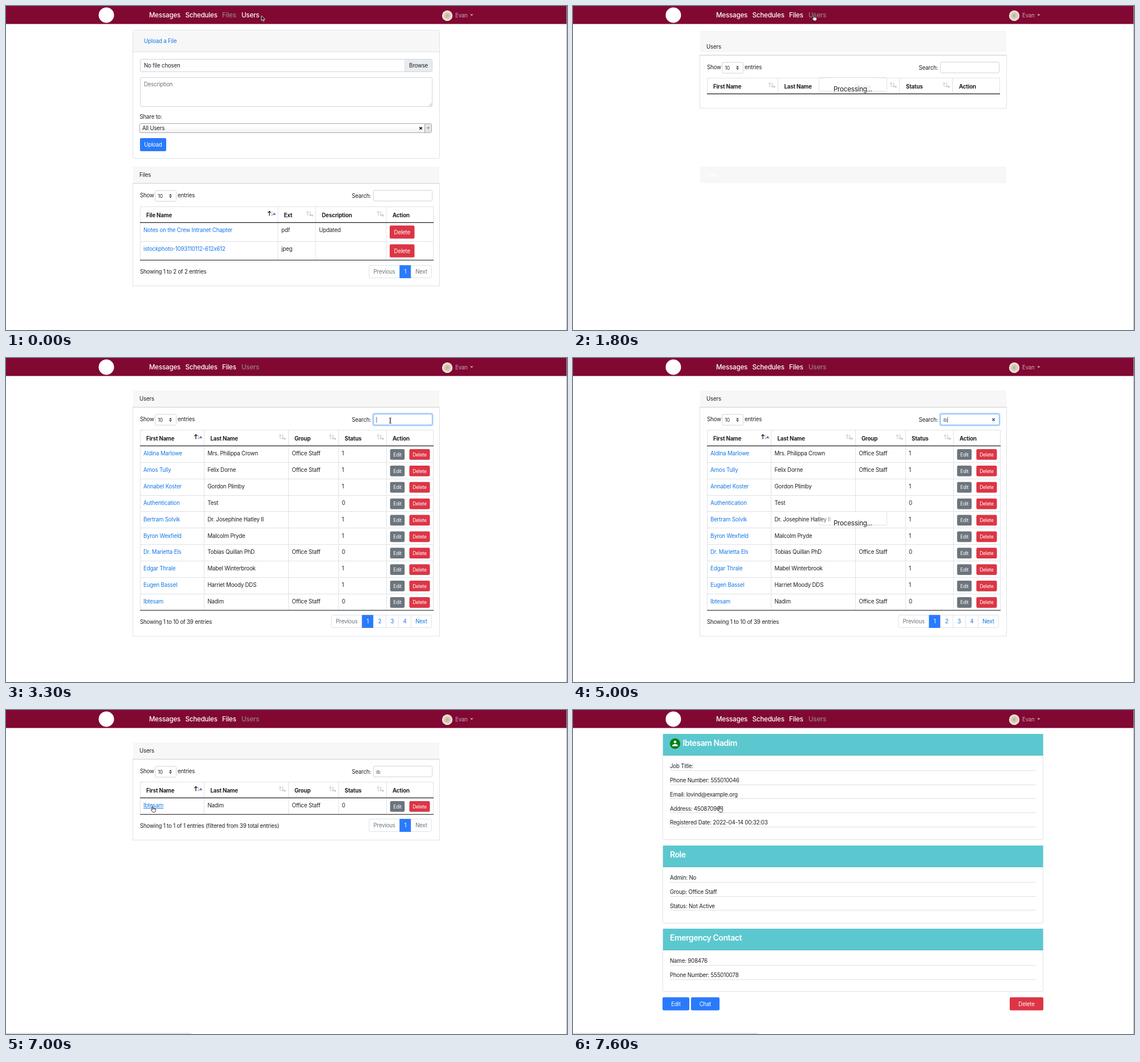
An HTML page that plays this animation: 984 by 569 pixels, repeating every 8 s.

```html
<!DOCTYPE html>
<html lang="en">
<head>
<meta charset="utf-8">
<title>Staff admin</title>
<style>
html, body { margin: 0; width: 100%; height: 100%; overflow: hidden; background: #fff; }
svg { display: block; }
text { font: 400 9.68px Inter, "Liberation Sans", sans-serif; letter-spacing: -.018em; fill: #1d2124; }
.nav { font-size: 11.6px; font-weight: 500; fill: #fff; }
.active { fill: #96808a; }
.link { fill: #1677e6; }
.muted { fill: #6c757d; }
.white { fill: #fff; }
.head { font-weight: 700; }
.small { font-size: 8.47px; }
.title { font-size: 14.1px; font-weight: 600; fill: #fff; letter-spacing: -.035em; }
.big { font-size: 11.6px; }
.mid { text-anchor: middle; }
</style>
</head>
<body>
<svg id="stage" width="984" height="569" viewBox="0 0 984 569"></svg>
<script>
const stage = document.getElementById('stage');
const LOOP = 8000, STEP = 100;
const BLUE = '#297bfd', RED = '#dc3545', GREY = '#6c757d', EDGE = '#dee2e6', FIELD = '#ced4da';
const PEOPLE = [
  ['Aldina Marlowe', 'Mrs. Philippa Crown', 'Office Staff', 1],
  ['Amos Tully', 'Felix Dorne', 'Office Staff', 1],
  ['Annabel Koster', 'Gordon Plimby', '', 1],
  ['Authentication', 'Test', '', 0],
  ['Bertram Solvik', 'Dr. Josephine Hatley II', '', 1],
  ['Byron Wexfield', 'Malcolm Pryde', '', 1],
  ['Dr. Marietta Els', 'Tobias Quillan PhD', 'Office Staff', 0],
  ['Edgar Thrale', 'Mabel Winterbrook', '', 1],
  ['Eugen Bassel', 'Harriet Moody DDS', '', 1],
  ['Ibtesam', 'Nadim', 'Office Staff', 0]
];

const clamp = v => Math.max(0, Math.min(1, v));
const ease = v => v * v * (3 - 2 * v);
const text = (x, y, s, cls = '', more = '') => `<text x="${x}" y="${y}" class="${cls}" ${more}>${s}</text>`;
const rect = (x, y, w, h, fill, stroke = 'none', more = '') =>
  `<rect x="${x}" y="${y}" width="${w}" height="${h}" fill="${fill}" stroke="${stroke}" ${more}/>`;
const path = (d, stroke, fill = 'none', more = '') => `<path d="${d}" stroke="${stroke}" fill="${fill}" ${more}/>`;
const hline = (x1, x2, y, color = EDGE, w = 1) => path(`M${x1} ${y}H${x2}`, color, 'none', `stroke-width="${w}"`);
const vline = (x, y1, y2) => path(`M${x} ${y1}V${y2}`, EDGE);
const button = (x, y, w, h, fill, label, cls = '') =>
  rect(x, y, w, h, fill, 'none', 'rx="2.3"') + text(x + w / 2, y + h / 2 + (cls ? 3.2 : 3.5), label, 'white mid ' + cls);
const field = (x, y, w, h) => rect(x, y, w, h, '#fff', FIELD, 'rx="2.4"');

function navbar(active) {
  const items = [['Messages', 251], ['Schedules', 314.5], ['Files', 379], ['Users', 413]];
  return rect(0, 0, 984, 31.6, '#800833') +
    '<circle cx="176" cy="16" r="13.5" fill="#fff"/>' +
    items.map(([s, x]) => text(x, 20, s, 'nav' + (s === active ? ' active' : ''))).join('') +
    '<circle cx="774" cy="17" r="9.2" fill="url(#avatar)"/>' +
    text(788, 19.5, 'Evan', '', 'style="fill:#cda5b4"') +
    path('M814 14.5h5.6l-2.8 2.9z', 'none', '#cda5b4') +
    rect(983, 0, 1, 569, '#a8a8a8');
}

function sortIcon(x, y, active) {
  const down = path(`M${x + 7.5} ${y - 4}v8m-2.4 -2.4l2.4 2.4l2.4 -2.4`, '#bfc3c7');
  const up = path(`M${x + 3} ${y + 4}v-8m-2.6 2.6l2.6 -2.6l2.6 2.6`, active ? '#222' : '#bfc3c7', 'none',
    `stroke-width="${active ? 1.3 : 1}"`);
  const mark = active
    ? path(`M${x + 8.5} ${y + 2.5}h6l-3 -4.5z`, 'none', '#6a7fc0')
    : path(`M${x + 8.5} ${y + 2}h5l-2.5 4z`, 'none', '#c6cacd');
  return down + up + mark;
}

// Card header plus the "Show entries" and "Search" controls.
function cardTop(y, title, bottom) {
  return rect(223, y, 537, 29, '#f7f7f7') + text(234, y + 18, title) +
    rect(222.5, y + 29.5, 538, bottom - y - 29.5, '#fff', EDGE) +
    hline(222, 761, y + 29.5, '#d9dadb', 1.4) +
    text(235, y + 54, 'Show') + field(261.5, y + 42, 37, 19) +
    text(266.5, y + 55, '10', 'small') +
    path(`M286 ${y + 50.7}h5l-2.5 -2.8zM286 ${y + 52.3}h5l-2.5 2.8z`, 'none', '#343a40') +
    text(301, y + 54, 'entries') + text(606.5, y + 55, 'Search:') + field(644.5, y + 41.5, 103, 19);
}

// cols: [label, text x, icon x, right border x]
function tableHead(y, cols, right, bottom, sorted) {
  return rect(235.5, y + .5, right - 235.5, bottom - y - .5, 'none', EDGE) +
    cols.map(([label, x, icon, line], i) => text(x, y + 18.5, label, 'head') +
      (icon ? sortIcon(icon, y + 12.5, sorted && i === 0) : '') +
      (line ? vline(line, y, bottom) : '')).join('') +
    hline(235, right + .5, y + 28.4, '#222', 1.2);
}

function pager(y, count) {
  const labels = ['Previous', ...Array.from({ length: count }, (_, i) => i + 1), 'Next'];
  const widths = labels.map(s => s === 'Previous' ? 53.7 : s === 'Next' ? 36 : s === 1 ? 20 : 22);
  let x = 746.5 - widths.reduce((a, b) => a + b);
  return labels.map((s, i) => {
    const on = s === 1, off = i === 0 || (s === 'Next' && count === 1), w = widths[i];
    const box = on
      ? rect(x - .2, y + .2, w + .2, 22.8, BLUE)
      : rect(x, y + .5, w, 22, '#fff', EDGE, i === 0 || s === 'Next' ? 'rx="2"' : '');
    const cell = box + text(x + w / 2, y + 15, s, 'mid ' + (on ? 'white' : off ? 'muted' : 'link'));
    x += w;
    return cell;
  }).join('');
}

function filesPage() {
  const rows = [['Notes on the Crew Intranet Chapter', 'pdf', 'Updated'], ['istockphoto-1093110112-612x612', 'jpeg', '']];
  return rect(222.5, 42.5, 538, 225, '#fff', EDGE, 'rx="2.4"') +
    rect(223, 43, 537, 37, '#f7f7f7') + hline(223, 760, 80.5) +
    text(242, 65, 'Upload a File', 'link') +
    field(235.5, 93.5, 512, 22) + rect(700, 94, 47, 21, '#e9ecef') + vline(699.5, 94, 115) +
    text(242, 108, 'No file chosen') + text(707, 108, 'Browse') +
    field(235.5, 125.5, 512, 51) + text(242, 140.5, 'Description', 'muted') +
    path('M742 175.5l4.5 -4.5m-2 4.5l2 -2', '#888', 'none', 'stroke-width=".7"') +
    text(234.5, 197.5, 'Share to:') +
    rect(234.5, 206.5, 512, 16, 'url(#select)', '#aaa', 'rx="2"') +
    rect(735, 207, 11, 15, '#e4e4e4') + path('M734.5 207v15', '#aaa') +
    path('M738 213h5l-2.5 3.2z', 'none', '#888') +
    text(239, 218.3, 'All Users') + path('M725.4 212.6l4.2 4.2m0 -4.2l-4.2 4.2', '#111', 'none', 'stroke-width="1.5"') +
    button(235, 232, 46, 23, BLUE, 'Upload') +
    cardTop(282, 'Files', 491.5) +
    tableHead(352, [['File Name', 246, 459, 477], ['Ext', 487.5, 526, 543], ['Description', 554, 650, 667], ['Action', 678]], 749.5, 446, true) +
    hline(235, 750, 413.5) + hline(235, 750, 446.3, '#444', 1.2) +
    rows.map(([name, ext, note], i) => {
      const y = 396.5 + 33 * i;
      return text(241, y, name, 'link') + text(483, y, ext) + text(549, y, note) + button(673, y - 11, 43.5, 23, RED, 'Delete');
    }).join('') +
    text(235, 470, 'Showing 1 to 2 of 2 entries') + pager(455, 1);
}

const processing = y => rect(431.5, y + .5, 119, 24, 'url(#veil)', EDGE, 'rx="2.4"') +
  text(491, y + 24.7, 'Processing...', 'big mid');

function loadingPage(t) {
  const head = [['First Name', 246, 342, 359.5], ['Last Name', 370.5, 0, 482.5], ['Group', 494, 555, 572.5],
    ['Status', 584, 648, 665.5], ['Action', 677]];
  const stale = t < 1900
    ? rect(223, 57, 537, 28, '#fff') + rect(223, 43, 537, 38, '#f7f7f7') + text(234, 75, 'Users') +
      rect(223, 282, 537, 29, '#f7f7f7') + text(234, 300.5, 'Files', 'white')
    : '';
  return cardTop(57, 'Users', 179.5) + tableHead(126, head, 748.5, 154, false) + stale + processing(125);
}

function usersPage(people, t) {
  const pitch = 28.87, bottom = 154.5 + pitch * people.length, single = people.length === 1;
  const head = [['First Name', 246, 330, 347.5], ['Last Name', 358.5, 478, 495.5], ['Group', 506, 566, 583.5],
    ['Status', 594, 650, 667.5], ['Action', 678]];
  const hover = t >= 6600 ? 'text-decoration="underline"' : '';
  return cardTop(57, 'Users', Math.round(bottom) + 45.5) +
    tableHead(126, head, 749.5, bottom, true) +
    people.map(([first, last, group, status], i) => {
      const y = 171.2 + pitch * i, top = 160.1 + pitch * i;
      return text(241, y, first, 'link', hover) + text(353.5, y, last) + text(501.5, y, group) + text(589, y, status) +
        button(673.7, top, 25.5, 18.7, GREY, 'Edit', 'small') + button(707.5, top, 36, 18.7, RED, 'Delete', 'small') +
        (i ? hline(235, 750, Math.round(154 + pitch * i) + .5) : '');
    }).join('') +
    hline(235, 750, bottom, '#444', 1.2) +
    text(235, bottom + 23.5, single ? 'Showing 1 to 1 of 1 entries (filtered from 39 total entries)' : 'Showing 1 to 10 of 39 entries') +
    pager(Math.round(bottom + 8), single ? 1 : 4) + searchBox(t) +
    (t >= 3800 && !single ? processing(269) : '');
}

function searchBox(t) {
  const focus = clamp((t - 3000) / 300) * clamp((6900 - t) / 300);
  const typed = t < 3800 ? '' : t < 4300 ? 'i' : 'ib';
  const caretOn = [[3200, 3600], [3800, 4800], [5000, 5800], [6300, 6700]].some(([a, b]) => t >= a && t < b);
  const caretX = 650 + [0, 2, 7][typed.length];
  return (focus ? rect(643.3, 97.3, 105.4, 21.4, 'none', '#007bff', `rx="3" stroke-width="2" opacity="${.27 * focus}"`) +
      rect(644.5, 98.5, 103, 19, 'none', '#80b8fa', `rx="2.4" opacity="${focus}"`) : '') +
    text(649.5, 112, typed, 'small', 'style="fill:#495057"') +
    (typed && t < 6700 ? path('M735.4 106l4.4 4.4m0 -4.4l-4.4 4.4', '#2d5590', 'none', 'stroke-width="1.4"') : '') +
    (caretOn ? path(`M${caretX} 103.5v10`, '#555', 'none', 'stroke-width=".9"') : '');
}

function profilePage() {
  const card = (y, h, title, x, rows) => rect(157.5, y + .5, 667, h, '#fff', EDGE, 'rx="2.4"') +
    rect(158, y, 666.5, 37.5, '#5bc8cf') + hline(158, 824.5, y + 37.5, '#50b4bb') + text(x, y + 21.4, title, 'title') +
    rows.map((s, i) => text(170, y + 60.4 + 24.7 * i, s) + hline(170, 812, Math.round(y + 64 + 24.7 * i) + .5, '#e0e0e0')).join('');
  return card(42, 185, 'Ibtesam Nadim', 192.5, ['Job Title:', 'Phone Number: 555010046', 'Email: lovind@example.org',
      'Address: 450870962', 'Registered Date: 2022-04-14 00:32:03']) +
    '<circle cx="179" cy="59" r="9.2" fill="#0a8012"/><circle cx="179" cy="56" r="2.3" fill="#fff"/>' +
    path('M174 63.5v-1.2q1.2-2.6 5-2.6t5 2.6v1.2z', 'none', '#fff') +
    card(238, 136, 'Role', 170, ['Admin: No', 'Group: Office Staff', 'Status: Not Active']) +
    card(384, 110, 'Emergency Contact', 170, ['Name: 908476', 'Phone Number: 555010078']) +
    button(157, 504.5, 47, 23, BLUE, 'Edit') + button(207, 504.5, 50, 23, BLUE, 'Chat') +
    button(766, 504.5, 59, 23, RED, 'Delete');
}

// Pointer shapes, hot spot at 0,0.
const POINTERS = {
  arrow: path('M0 0v8.6l2-1.8 1.4 3.2 1.5-.7-1.4-3h2.7z', '#fff', '#111', 'stroke-width=".8"'),
  hand: path('M-.8.9Q0-.4.9.9V4.3q1-.6 1.6.2 1-.4 1.5.5 1.4-.2 1.5 1.1V8q0 2.3-1.7 3H.6Q-.8 9.3-2.5 7q.1-1.3 1.7-.2z', '#222', '#fff', 'stroke-width=".9"') +
    path('M.9 4.6v1.6m1.7-1.4v1.5m1.5-1v1.2', '#222', 'none', 'stroke-width=".6"'),
  beam: path('M-2-4.8q2 0 2 1.2V3.6q0 1.2-2 1.2M2-4.8q-2 0-2 1.2V3.6q0 1.2 2 1.2', '#222', 'none', 'stroke-width=".9"')
};

function pointer(t) {
  if (t >= 3800 && t < 5900) return '';
  const spots = [[448, 17], [422, 15], [674, 110], [257, 168.5]];
  const [leg, p] = t < 2400 ? [0, t / 500] : t < 5800 ? [1, (t - 2400) / 500] : [2, (t - 5800) / 800];
  const k = ease(clamp(p)), [a, b] = [spots[leg], spots[leg + 1]];
  const x = a[0] + (b[0] - a[0]) * k, y = a[1] + (b[1] - a[1]) * k;
  const overNav = y < 24 && x < 444;
  const overField = x > 644 && x < 748 && y > 98 && y < 118;
  const overLink = x < 274 && y > 160;
  const kind = overField ? 'beam' : overNav || overLink ? 'hand' : 'arrow';
  return `<g transform="translate(${x} ${y})">${POINTERS[kind]}</g>`;
}

const DEFS = `<defs>
  <linearGradient id="select" x2="0" y2="1"><stop offset=".4" stop-color="#fff"/><stop offset="1" stop-color="#eee"/></linearGradient>
  <linearGradient id="veil"><stop stop-color="#fff" stop-opacity="0"/><stop offset=".25" stop-color="#fff" stop-opacity=".9"/>
    <stop offset=".75" stop-color="#fff" stop-opacity=".9"/><stop offset="1" stop-color="#fff" stop-opacity="0"/></linearGradient>
  <radialGradient id="avatar"><stop offset="0" stop-color="#c9ab8c"/><stop offset=".6" stop-color="#ddcfbd"/><stop offset="1" stop-color="#f4f1ec"/></radialGradient>
</defs>`;

function scene(t) {
  const page = t < 1800 ? filesPage()
    : t < 2200 ? loadingPage(t)
    : t < 5800 ? usersPage(PEOPLE, t)
    : t < 7300 ? usersPage(PEOPLE.slice(-1), t)
    : profilePage();
  const status = t >= 6700 ? rect(-4, 567.5, 329, 8, '#e2e3e4', '#d0d0d0', 'rx="2" stroke-width=".5"') : '';
  return DEFS + page + navbar(t < 1800 ? 'Files' : 'Users') + status + pointer(t);
}

let start, shown;
function tick(now) {
  start ??= now;
  const t = Math.floor((now - start) % LOOP / STEP) * STEP;
  if (t !== shown) stage.innerHTML = scene(shown = t);
  requestAnimationFrame(tick);
}
requestAnimationFrame(tick);
</script>
</body>
</html>
```
